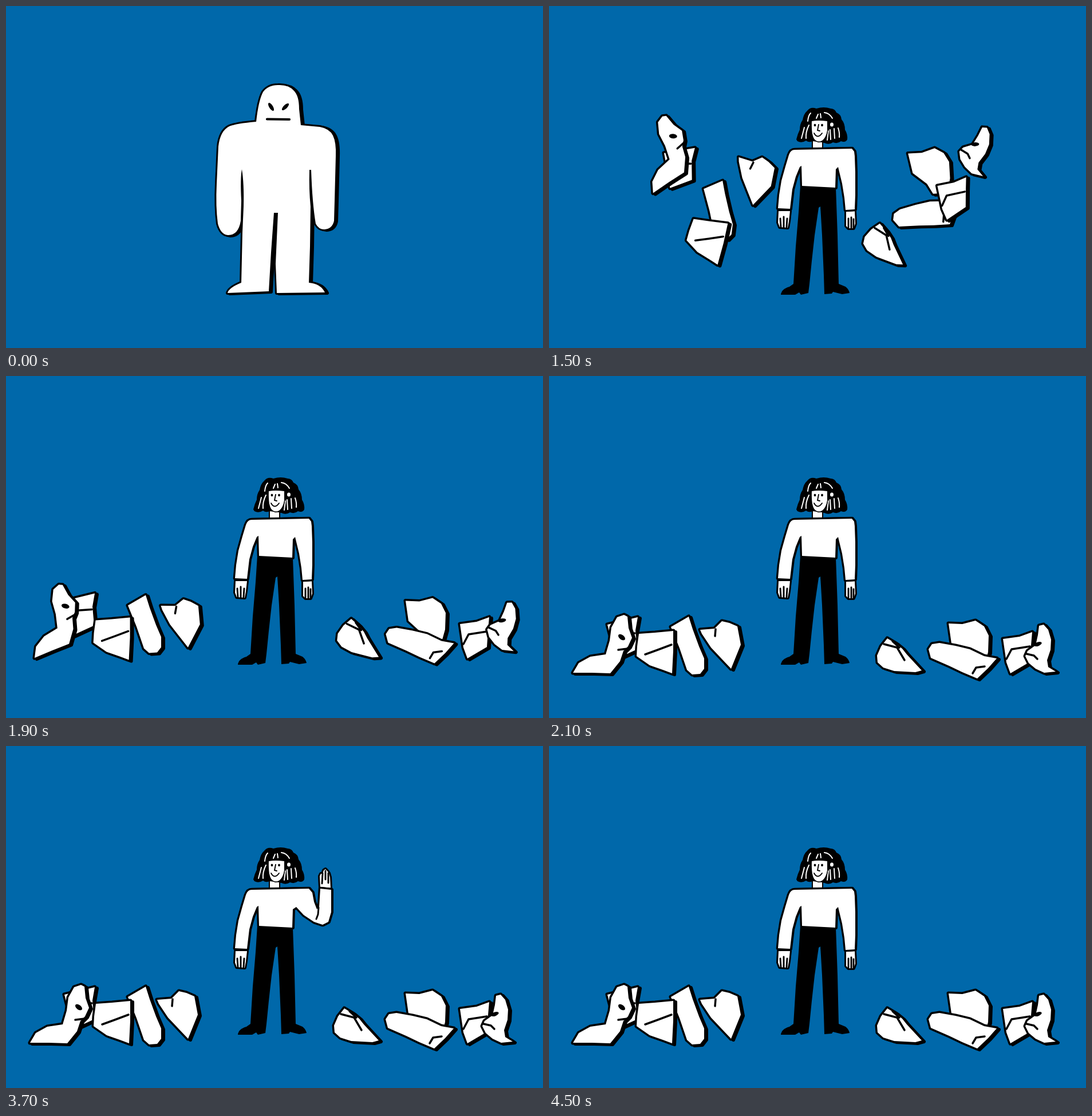
These frames come from a looping animation (938 by 597 pixels, 4600 ms). An HTML page with a canvas:

```html
<!DOCTYPE html>
<html lang="en">
<head>
<meta charset="utf-8">
<title>Out of the shell</title>
<style>
html, body { margin: 0; width: 100%; height: 100%; overflow: hidden; background: #0068aa; }
canvas { display: block; width: 938px; height: 597px; }
</style>
</head>
<body>
<canvas id="stage" width="938" height="597"></canvas>
<script>
const ctx = document.getElementById('stage').getContext('2d');
const LOOP = 4600, STEP = 100;
const BLUE = '#0068aa', INK = '#000', PAPER = '#fff';
const P = d => new Path2D(d);
const mix = (a, b, k) => a + (b - a) * k;
const clamp = v => Math.max(0, Math.min(1, v));
const rad = deg => deg * Math.PI / 180;

function line(path, width, color = INK) {
  ctx.strokeStyle = color;
  ctx.lineWidth = width;
  ctx.stroke(path);
}

function fill(path, color = INK) {
  ctx.fillStyle = color;
  ctx.fill(path);
}

// White shape with an outer ink line; block() draws the thick side.
function outlined(path, width = 6) {
  line(path, width);
  fill(path, PAPER);
}

function block(path, dx, dy, width) {
  ctx.save();
  ctx.translate(dx, dy);
  line(path, width);
  fill(path);
  ctx.restore();
}

function blob(x, y, rx, ry, deg, color = INK) {
  ctx.fillStyle = color;
  ctx.beginPath();
  ctx.ellipse(x, y, rx, ry, rad(deg), 0, 7);
  ctx.fill();
}

function turned(x, y, deg, draw) {
  ctx.save();
  ctx.translate(x, y);
  ctx.rotate(rad(deg));
  ctx.translate(-x, -y);
  draw();
  ctx.restore();
}

function spin([x, y], [cx, cy], deg) {
  const c = Math.cos(rad(deg)), s = Math.sin(rad(deg));
  return [cx + (x - cx) * c - (y - cy) * s, cy + (x - cx) * s + (y - cy) * c];
}

// --- Giant ---
const giant = P('M437 202Q441 165 449 150Q458 138 475 138Q494 137 503 148Q512 157 512 180L515 208' +
  'L548 211Q565 214 571 226Q577 238 576 262L574 340L573 375Q570 389 556 390Q546 390 541 380' +
  'Q535 345 533 286L530 286Q529 320 532 350L531 420L529 483Q550 485 557 500L473 501L471 450' +
  'L475 361L468 361L463 430L459 498L387 501Q389 492 411 483L413 395L415 350Q416 310 412 285' +
  'Q409 300 411 340L410 375Q406 400 388 400Q375 399 370 380Q366 350 368 310L371 245' +
  'Q374 218 390 210Q402 205 437 202Z');
const mouth = P('M456 197.5L495 198');
const cracks = [
  [500, P('M474 138L478 153L480 169L470 199L434 238M477 152L450 168L446 180V194' +
    'M470 199L486 223L460 267L468 288L480 313L471 330L475 350L470 360')],
  [700, P('M484 173L499 188M486 223L518 221L540 209M434 238L409 264M460 267L437 297M480 313L507 338')],
  [900, P('M384 236L434 238M370 276L384 261L409 264L404 282M441 230L452 243L447 254L433 263' +
    'M486 223L503 248L526 265L551 274L556 300L566 303M518 221L540 241L558 238M540 241L537 255' +
    'M503 248L500 264L518 288L528 300M518 288L515 302L516 318M526 265L528 290')]
];

function drawGiant(t) {
  block(giant, 4, 1, 6);
  outlined(giant);
  blob(463, 176, 3.2, 8, -32);
  blob(488, 176, 3.2, 8, 45);
  line(mouth, 4.2);
  for (const [start, path] of cracks) if (t >= start) line(path, 3.6);
}

// --- Rubble, drawn as it lies on the ground ---
// c = centre, from = [x, y, turn] on the giant, air = [dx, dy, turn] at the end of the burst
const poly = s => P('M' + s + 'Z');
const rubble = [
  { p: poly('102 434L155 421L151 444L154 477L117 494L110 474L108 457'), m: P('M109 462L121 451L150 449'),
    c: [130, 457], from: [405, 240, 12], air: [0, -99, 0] },
  { p: poly('42 518L52 501L72 490L99 486L106 462L109 439L119 421L131 417L137 420L139 440L145 457L138 472L130 480L124 498L107 519L75 518'),
    m: P('M121 478L137 476'), eye: [127, 456, 7, 4, 38],
    c: [98, 476], from: [455, 200, 3], air: [-31, -106, -55] },
  { p: poly('264 443L289 441L302 428L315 431L329 437L335 469L318 511L300 492L283 474L267 450'),
    m: P('M291 442L290 454'),
    c: [305, 466], from: [445, 260, 38], air: [10, -91, 13] },
  { p: poly('213 438L244 420L251 442L262 472L271 493L271 511L264 520L250 521L241 513L228 475'),
    c: [242, 470], from: [392, 340, 20], air: [0, -89, 0] },
  { p: poly('157 450L185 448L217 445L217 480L215 519L199 513L176 505L153 489L154 472'),
    m: P('M168 486L190 478L214 469'),
    c: [186, 482], from: [437, 400, 35], air: [-1, -56, 0] },
  { p: poly('591 458L606 467L617 476L625 486L651 514L640 517L603 515L584 509L574 500L573 488L580 472'),
    m: P('M585 468L608 474L621 496M600 463L612 474'),
    c: [606, 495], from: [515, 420, 1], air: [11, -76, 26.5] },
  { p: poly('698 432L722 433L745 427L760 437L768 453L767 482L760 507L735 506L726 488L703 467'),
    c: [734, 469], from: [543, 245, -15], air: [0, -94, 0] },
  { p: poly('663 477L669 468L682 466L710 471L735 477L760 489L782 493L767 510L748 528L722 517L699 506L667 492'),
    m: P('M740 519L746 509L761 507'),
    c: [724, 496], from: [553, 325, -75], air: [1, -63, 0] },
  { p: poly('793 459L822 455L844 447L842 470L840 499L806 519L799 500'),
    m: P('M799 494L808 477L840 472'),
    c: [820, 483], from: [500, 290, -10], air: [0, -62, 0] },
  { p: poly('856 436L864 434L872 443L877 460L876 478L870 496L872 508L885 516L865 518L850 511L838 501L832 489L836 480L850 470L854 452'),
    m: P('M834 485L847 488L853 494'), eye: [854, 468, 7, 3.4, -22],
    c: [860, 481], from: [495, 185, 1], air: [23, -96, 29] }
];

function drawRubble(t) {
  const out = clamp((t - 1300) / 400), lift = 1 - clamp((t - 1700) * 0.0029);
  const kx = 1 - Math.pow(1 - out, 1.5), ky = Math.pow(out, 1.5);
  for (const { p, m, eye, c, from, air } of rubble) {
    const x = mix(from[0], c[0] + air[0] * lift, kx);
    const y = mix(from[1], c[1] + air[1] * lift, ky);
    const turn = mix(from[2], air[2] * lift, kx);
    ctx.save();
    ctx.translate(x, y);
    ctx.rotate(rad(turn));
    ctx.translate(-c[0], -c[1]);
    block(p, ...spin([4, 2], [0, 0], -turn), 6);
    outlined(p, 7);
    if (m) line(m, 3.5);
    if (eye) blob(...eye);
    ctx.restore();
  }
}

// --- Woman ---
const pants = P('M439 314L501 317L504 400L506 485L518 490Q524 495 525 501L512 503L496 499L494 502L481 503' +
  'L480 470L477 400L474 350L471 352L464 400L459 445L455 485L453 501L440 504L437 500L430 504L405 504' +
  'Q406 494 420 490L427 485L431 420L436 360Z');
const hair = P('M432 233Q434 224 438 216Q438 206 443 199Q445 188 451 183Q457 175 467 179Q480 175 492 179' +
  'Q499 179 502 186Q510 189 511 198Q517 205 517 216Q522 224 521 233Q518 239 510 236Q504 241 496 238' +
  'Q489 243 481 239L460 236Q454 239 449 235Q441 240 434 236Z');
const face = P('M459 201Q470 199 486 201L486 217Q484 230 477 235Q470 239 464 233Q458 226 459 201Z');
const neck = P('M461 236L477 238L477 250L461 250Z');
const shine = P('M441 231Q444 220 446 212M449 231Q448 220 454 208M452 201Q453 191 457 187M486 234L488 218' +
  'M492 233L491 216M499 231L498 214M507 229Q508 222 505 213M481 186Q490 187 495 196M467 196L470 189M475 195L474 188');
const features = P('M471 207L469 217L473 218M463 222Q469 233 477 222');
const handL = P('M401 358L400 378L403 386L417 387L419 376L421 358Z');
const handR = P('M519 358L519 384L523 388L532 388L535 380L534 358Z');
const handUp = P('M549 248L548 227L550 223L553 223L555 217L558 215L561 218L564 222L566 229L567 248Z');
const fingersL = P('M405 386L404 371M410 387V368M415 386L416 371');
const fingersR = P('M523 388L523 371M528 389V369M532 388L532 372');
const fingersUp = P('M552 240L553 222M558 233L558 218M563 239L563 222');
const SHOULDER = [520, 262], ELBOW = [557, 300];

// pose: swing is the straight arm's angle; wave is the raised forearm's angle.
function sleeve({ up, swing, wave }) {
  if (up) {
    const fore = [[549, 249], [568, 251], [568, 290]].map(p => spin(p, ELBOW, wave));
    return [[535, 256], [538, 272], [543, 285], [547, 281], ...fore,
      [563, 307], [553, 312], [538, 307], [520, 295], [507, 281]];
  }
  const arm = [[534, 262], [535, 290], [535, 330], [534, 355], [518, 356], [516, 335], [512, 310]];
  return [[533, 254], ...arm.map(p => spin(p, SHOULDER, -swing)), [505, 281]];
}

function drawHand(path, fingers) {
  outlined(path, 6);
  line(fingers, 2.9);
}

function drawWoman(pose) {
  fill(pants);
  fill(hair);
  line(shine, 2, PAPER);
  blob(494, 207, 3, 3.5, 0, PAPER);
  outlined(neck, 4);
  outlined(face, 3);
  line(features, 1.9);
  blob(464.5, 208, 1.9, 2.3, 0);
  blob(477, 208, 1.9, 2.3, 0);

  drawHand(handL, fingersL);
  if (pose.up) turned(...ELBOW, pose.wave, () => drawHand(handUp, fingersUp));
  else turned(...SHOULDER, -pose.swing, () => drawHand(handR, fingersR));

  const top = P('M500 317L442 314L441 279L438 281L431 298L425 320L421 354L400 353L402 330L406 305' +
    'L413 280L419 260Q422 251 429 251L480 250L529 249');
  for (const p of sleeve(pose)) top.lineTo(...p);
  top.lineTo(501, 285);
  top.closePath();
  block(top, 1, 0, 6);
  outlined(top, 6.6);
  if (pose.up) line(P('M546 282L545 294L542 302'), 3);
}

const WAVE = [0, -10, 0, 5];
function poseAt(t) {
  if (t === 2600 || t === 4400) return { up: false, swing: 31 };
  if (t < 2600 || t > 4400) return { up: false, swing: 0 };
  return { up: true, wave: WAVE[(t - 2500) / STEP % 4] };
}

function draw(t) {
  ctx.fillStyle = BLUE;
  ctx.fillRect(0, 0, 938, 597);
  ctx.lineJoin = ctx.lineCap = 'round';
  if (t < 1400) return drawGiant(t);
  drawWoman(poseAt(t));
  drawRubble(t);
}

const begin = performance.now();
function tick() {
  const t = (performance.now() - begin) % LOOP;
  draw(Math.floor(t / STEP) * STEP);
  requestAnimationFrame(tick);
}
tick();
</script>
</body>
</html>
```
